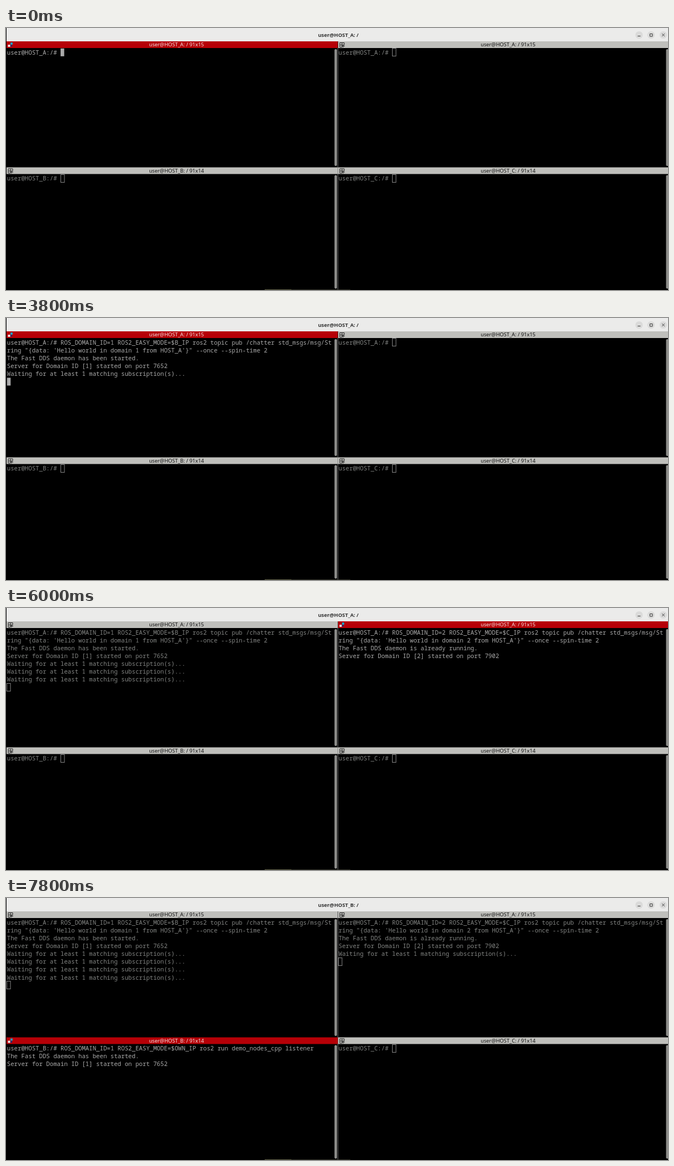
An HTML page for the animation above (8000 ms loop, 1190 px wide and 471 px high).

```html
<!DOCTYPE html>
<html lang="en">
<head>
<meta charset="utf-8">
<title>Terminal panes</title>
<style>
html, body { margin: 0; width: 100%; height: 100%; overflow: hidden; background: #000; }
svg { display: block; width: 1190px; height: 471px; }
text { white-space: pre; }
.mono { font: 10.7px "Noto Sans Mono", "DejaVu Sans Mono", monospace; }
.bar { font: 9.25px "Noto Sans", sans-serif; text-anchor: middle; }
.title { font: 600 9.3px "Noto Sans", sans-serif; text-anchor: middle; }
</style>
</head>
<body>
<svg id="stage" viewBox="0 0 1190 471" xmlns="http://www.w3.org/2000/svg"></svg>
<script>
const LOOP = 8000, COLS = 91, CHAR = 6.42, ROW = 14.13;
const NS = 'http://www.w3.org/2000/svg';
const stage = document.getElementById('stage');

function add(parent, tag, attrs, text) {
  const el = document.createElementNS(NS, tag);
  set(el, attrs);
  if (text) el.textContent = text;
  parent.appendChild(el);
  return el;
}
function set(el, attrs) {
  for (const k in attrs) el.setAttribute(k, attrs[k]);
}
const rect = (p, x, y, width, height, fill, more) =>
  add(p, 'rect', { x, y, width, height, fill, ...more });

const publish = (id, host) =>
  `ROS_DOMAIN_ID=${id} ROS2_EASY_MODE=$${host}_IP ros2 topic pub /chatter std_msgs/msg/String ` +
  `"{data: 'Hello world in domain ${id} from HOST_A'}" --once --spin-time 2`;
const STARTED = 'The Fast DDS daemon has been started.\n';
const RUNNING = 'The Fast DDS daemon is already running.\n';
const WAITING = 'Waiting for at least 1 matching subscription(s)...\n';
const server = (id, port) => `Server for Domain ID [${id}] started on port ${port}\n`;

// Each log entry is [time, appended text].
const panes = [
  { x: 1, y: 24, h: 226, host: 'A', size: '91x15', log: [
    [1000, publish(1, 'B')], [1400, '\n'], [1800, STARTED], [2600, server(1, 7652)],
    [3800, WAITING], [4800, WAITING], [6000, WAITING], [7000, WAITING]] },
  { x: 597, y: 24, h: 226, host: 'A', size: '91x15', log: [
    [4800, publish(2, 'C')], [5000, '\n'], [5200, RUNNING], [5600, server(2, 7902)],
    [7000, WAITING]] },
  { x: 1, y: 250.5, h: 220, host: 'B', size: '91x14', log: [
    [7000, 'ROS_DOMAIN_ID=1 ROS2_EASY_MODE=$OWN_IP ros2 run demo_nodes_cpp listener'],
    [7200, '\n'], [7400, STARTED], [7600, server(1, 7652)]] },
  { x: 597, y: 250.5, h: 220, host: 'C', size: '91x14', log: [] }
];
const focusAt = t => t < 4200 ? 0 : t < 6400 ? 1 : 2;
const hidden = [[200, 800], [2000, 2600], [3200, 3800], [5600, 6200], [7800, 8000]];
const cursorOn = t => !hidden.some(([a, b]) => t >= a && t < b);

function wrap(text) {
  return text.split('\n').flatMap(line => {
    const rows = [];
    do {
      rows.push(line.slice(0, COLS));
      line = line.slice(COLS);
    } while (line);
    return rows;
  });
}

function groupIcon(p, x, y) {
  const g = add(p, 'g', { transform: `translate(${x} ${y})`, fill: 'none', stroke: '#222' });
  add(g, 'path', { d: 'M.5 .5h4v4h-4zM.5 4.5v4h4v-4M4.5 .5h4v4h-4M6.5 5v4M4.5 6.5h5' });
  return g;
}
function focusIcon(p, x, y) {
  const g = add(p, 'g', { transform: `translate(${x} ${y})` });
  rect(g, 0, 4.5, 4, 4, '#e8e8e8');
  rect(g, 4.5, 0.5, 4, 4, '#1ca0c0');
  rect(g, 4.5, 5, 3, 3, '#222a70');
  return g;
}

function buildWindow() {
  rect(stage, 0, 0, 1190, 471, '#000');
  rect(stage, 1, 0, 1189, 24, '#ebebea');
  [1138, 1159.5, 1181.5].forEach(cx => add(stage, 'circle', { cx, cy: 12.5, r: 6.6, fill: '#dadad9' }));
  add(stage, 'path', { d: 'M1135.5 14.5h5M1157.5 10.5h4.5v4.5h-4.5zM1179.2 10.2l4.6 4.6m0-4.6l-4.6 4.6',
    fill: 'none', stroke: '#333', 'stroke-width': 1 });
  rect(stage, 596, 36, 1.2, 435, '#5c5c5c');
  rect(stage, 465, 470, 48, 1, '#6c6c50');
  rect(stage, 513, 470, 106, 1, '#34342a');
  return add(stage, 'text', { class: 'title', x: 597.5, y: 15.8, fill: '#333' });
}

function buildPane(p) {
  const { x, y, h } = p, mid = x + 305.5;
  p.bar = rect(stage, x, y, 595.5, 12, '#bfbfbb');
  p.name = add(stage, 'text', { class: 'bar', x: mid, y: y + 9.3 }, `user@HOST_${p.host}: / ${p.size}`);
  p.idle = groupIcon(stage, x + 2.5, y + 2);
  p.active = focusIcon(stage, x + 2.5, y + 1.5);
  rect(stage, x + 589.5, y + 14, 4.5, h - 16, '#8e8e8b', { rx: 2 });
  p.cursor = rect(stage, 0, 0, 6.5, 14, 'none');
  p.rows = Array.from({ length: 14 }, (_, i) =>
    add(stage, 'text', { class: 'mono', x: x + 0.8, y: y + 23.7 + i * ROW }));
}

function drawPane(p, t, focused) {
  const typed = p.log.filter(e => t >= e[0]).map(e => e[1]).join('');
  const rows = wrap(`user@HOST_${p.host}:/# ` + typed);
  const ink = focused ? '#aaaaaa' : '#828482';
  p.rows.forEach((el, i) => {
    el.textContent = rows[i] || '';
    el.setAttribute('fill', ink);
  });
  const last = rows.length - 1;
  const cx = p.x + 0.8 + rows[last].length * CHAR, cy = p.y + 12.8 + last * ROW;
  set(p.cursor, focused
    ? { x: cx, y: cy, width: 6.5, height: 14, fill: ink, stroke: 'none' }
    : { x: Math.floor(cx) + 0.5, y: Math.floor(cy) + 0.5, width: 6.5, height: 14, fill: 'none', stroke: '#858585' });
  p.cursor.style.display = focused && !cursorOn(t) ? 'none' : '';
  p.bar.setAttribute('fill', focused ? '#b60007' : '#bfbfbb');
  p.name.setAttribute('fill', focused ? '#f4e4e4' : '#111');
  p.idle.style.display = focused ? 'none' : '';
  p.active.style.display = focused ? '' : 'none';
}

const title = buildWindow();
panes.forEach(buildPane);

function draw(t) {
  const focus = focusAt(t);
  title.textContent = `user@HOST_${panes[focus].host}: /`;
  panes.forEach((p, i) => drawPane(p, t, i === focus));
}

const start = performance.now();
function tick(now) {
  draw(Math.max(0, now - start) % LOOP);
  requestAnimationFrame(tick);
}
draw(0);
requestAnimationFrame(tick);
</script>
</body>
</html>
```
